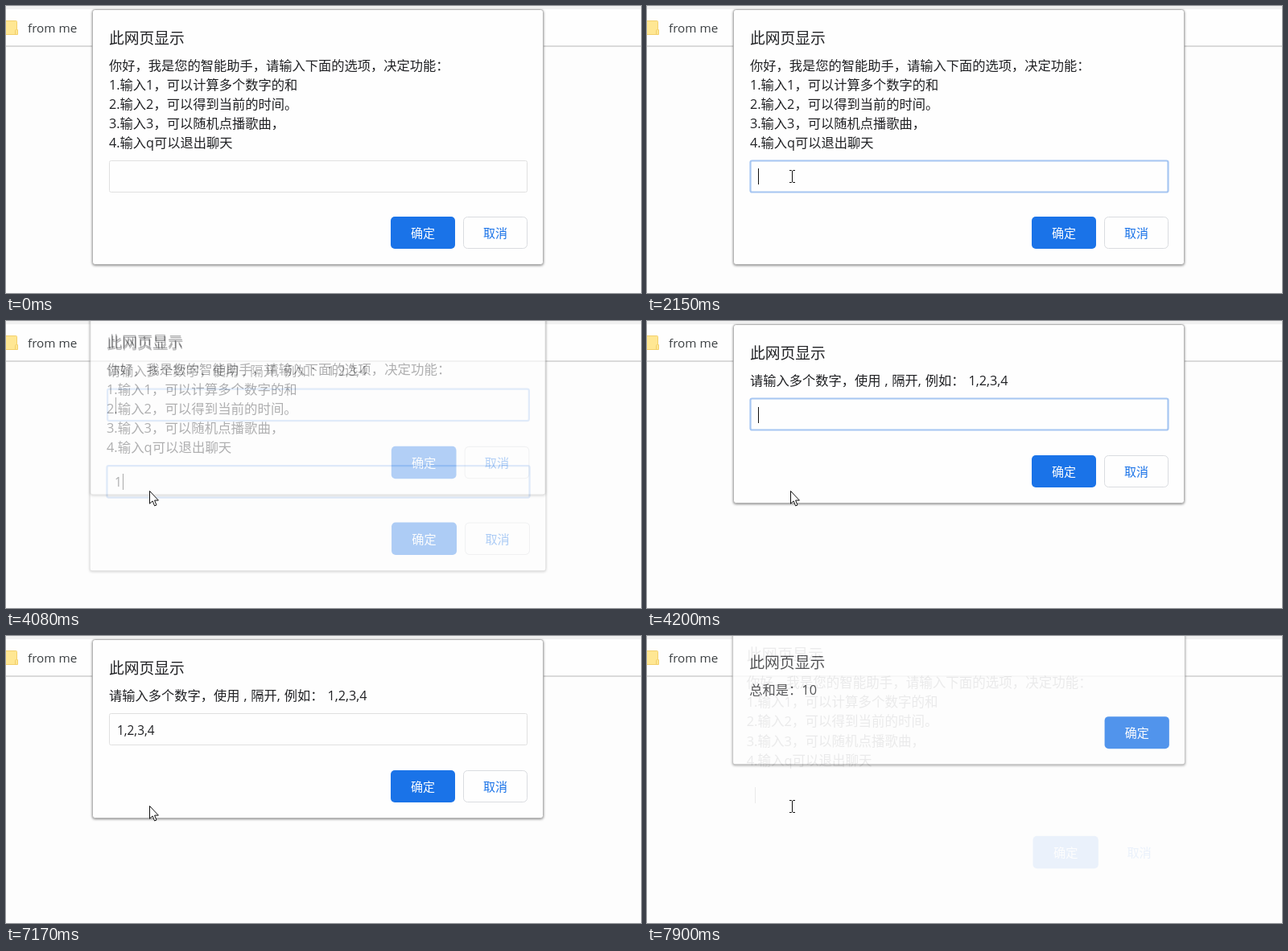
An HTML page that plays this animation: 789x357 px, repeating every 8 s.

```html
<!DOCTYPE html>
<html lang="zh-CN">
<head>
<meta charset="utf-8">
<title>Prompt dialogs</title>
<style>
html, body { margin: 0; width: 100%; height: 100%; overflow: hidden; background: #fdfdfd; }
svg { display: block; }
text { font-family: 'Open Sans', 'Noto Sans CJK SC', sans-serif; font-size: 16.25px; word-spacing: .7px; fill: #202124; }
.title { font-size: 18.8px; }
.btn { font-size: 15px; text-anchor: middle; fill: #1a73e8; }
.ok { fill: #fff; font-weight: 500; }
.entry { font-size: 15.4px; }
.mark { font-size: 15.3px; word-spacing: 0; fill: #3c4043; }
.panel { fill: #fefefe; stroke: #b4b4b4; filter: drop-shadow(0 1.5px 1.8px rgba(0,0,0,.45)); }
.faint rect { stroke: none; filter: none; }
</style>
</head>
<body>
<svg id="stage" width="789" height="357" viewBox="0 0 789 357"></svg>
<script>
const LOOP = 8000;
const stage = document.getElementById('stage');
const find = id => document.getElementById(id);

const rect = (x, y, w, h, attrs) => `<rect x="${x}" y="${y}" width="${w}" height="${h}" ${attrs}/>`;
const text = (x, y, cls, str) => `<text x="${x}" y="${y}" class="${cls}">${str}</text>`;

const okButton = (x, y) =>
  rect(x, y, 80, 40, 'rx="5" fill="#1a73e8"') + text(x + 40, y + 26, 'btn ok', '确定');

const cancelButton = (x, y) =>
  rect(x + .5, y + .5, 79, 39, 'rx="5" fill="#fefefe" stroke="#dadce0"') + text(x + 40, y + 26, 'btn', '取消');

function dialog(id, lines, hasInput) {
  const end = 86 + (lines.length - 1) * 24;
  const btnY = end + (hasInput ? 81 : 21) - (lines.length > 1 ? 1 : 0);
  let s = rect(107.5, 4.5, 560, btnY + 55, 'rx="3" class="panel"') + text(128, 47, 'title', '此网页显示');
  lines.forEach((line, i) => s += text(128, 80 + i * 23.9, '', line));
  if (hasInput) {
    s += rect(128.5, end + 10.5, 519, 39, `id="${id}Box" rx="2" fill="#fefefe"`)
      + text(138, btnY - 44, 'entry', `<tspan id="${id}Entry"></tspan>`)
      + rect(138, btnY - 60, 1, 20, `id="${id}Caret" fill="#111" shape-rendering="crispEdges"`)
      + okButton(478, btnY) + cancelButton(568, btnY);
  } else {
    s += okButton(568, btnY);
  }
  return `<g id="${id}">${s}</g>`;
}

stage.innerHTML =
  rect(0, 0, 789, 357, 'fill="#fdfdfd"') +
  rect(0, 0, 789, 4, 'fill="#f1f1f1"') +
  rect(0, 4, 789, 45, 'fill="#fefefe"') +
  rect(0, 49, 789, 2, 'fill="#dadada"') +
  '<path d="M-2 18.5H12.5Q13.5 18.5 13.5 19.5V29.5H14.5V35.5H-2Z" fill="#ffe793" stroke="#f3d06c"/>' +
  '<path d="M11.5 35V30.5Q11.5 29.5 13 29.5" fill="none" stroke="#f3d06c"/>' +
  text(27, 33, 'mark', 'from me') +
  dialog('ask', ['请输入多个数字，使用 , 隔开, 例如： 1,2,3,4'], true) +
  dialog('sum', ['总和是：10'], false) +
  dialog('menu', [
    '你好，我是您的智能助手，请输入下面的选项，决定功能：',
    '1.输入1，可以计算多个数字的和',
    '2.输入2，可以得到当前的时间。',
    '3.输入3，可以随机点播歌曲，',
    '4.输入q可以退出聊天'
  ], true) +
  '<path id="arrow" d="M.5 .5V16.2L4.1 12.9L6.6 18.9L9 17.9L6.6 12.1H11.4Z" fill="#fff" stroke="#111"/>' +
  '<path id="beam" d="M177 204.5H179.5L180.5 205.5L181.5 204.5H184M180.5 205V219M177 219.5H179.5L180.5 218.5L181.5 219.5H184" fill="none" stroke="#111"/>';

// k = 1 is fully open; lower values fade, lift and enlarge the window
function pose(id, k) {
  const el = find(id), lift = 18.5 * Math.pow(1 - k, .55), scale = 1 + .018 * (1 - k);
  el.style.display = k > 0 ? '' : 'none';
  el.classList.toggle('faint', k < .15);
  el.setAttribute('opacity', k);
  el.setAttribute('transform', `translate(388 ${-lift}) scale(${scale}) translate(-388 0)`);
}

const caretX = [138, 148, 150, 159, 163, 172, 175, 184];

function field(id, value, focus, caret) {
  const box = find(id + 'Box'), bar = find(id + 'Caret');
  find(id + 'Entry').textContent = value;
  box.setAttribute('stroke', focus ? '#a6c6f2' : '#e0e0e0');
  box.setAttribute('stroke-width', focus ? 2.2 : 1);
  bar.setAttribute('x', caretX[value.length]);
  bar.style.display = focus && caret ? '' : 'none';
}

// number of listed moments already passed
const passed = (t, times) => times.filter(m => t >= m).length;

const blinks = [1070, 1570, 2150, 2680, 3140];
const keys = [4970, 5280, 5810, 6060, 6340, 6590, 6870];
const windows = [
  [0, 1, 0, 0],
  [4080, .35, .5, 0],
  [4200, 0, 1, 0],
  [7300, 0, .2, .7],
  [7440, 0, 0, 1],
  [7900, .08, 0, .82]
];
const pointer = [[420, 117, 308], [550, 154, 240], [700], [4080, 178, 211], [7900]];

const at = (t, list) => list[passed(t, list.map(row => row[0])) - 1];

function draw(t) {
  const [, menu, ask, sum] = at(t, windows);
  pose('menu', menu);
  pose('ask', ask);
  pose('sum', sum);

  const typed = t >= 3540 && t < 7900;
  field('menu', typed ? '1' : '', t >= 1070, typed || t >= 7900 || passed(t, blinks) % 2 === 1);

  const n = passed(t, keys);
  field('ask', '1,2,3,4'.slice(0, n), t < 7170, n > 0 || t < 4570);

  const spot = at(t, pointer);
  const isArrow = !!spot && spot.length > 1;
  find('arrow').style.display = isArrow ? '' : 'none';
  find('beam').style.display = spot && !isArrow ? '' : 'none';
  if (isArrow) find('arrow').setAttribute('transform', `translate(${spot[1]} ${spot[2]})`);
}

const start = performance.now();
function tick() {
  draw((performance.now() - start) % LOOP);
  requestAnimationFrame(tick);
}
tick();
</script>
</body>
</html>
```
